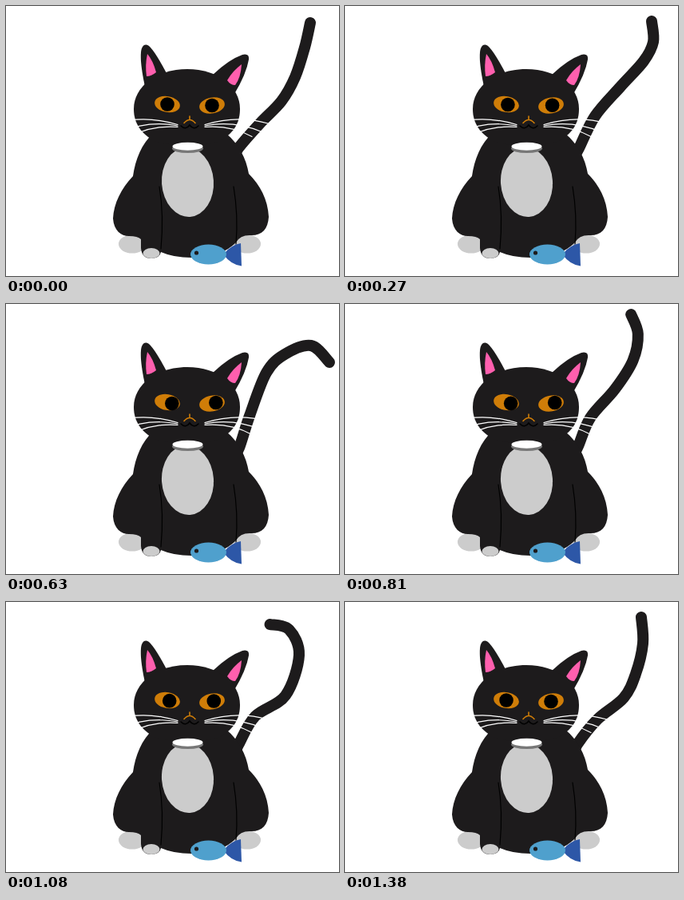
An HTML page that plays this animation: 417 by 338 pixels, repeating every 1410 ms.

```html
<!DOCTYPE html>
<html lang="en">
<head>
<meta charset="utf-8">
<title>Cat with swinging tail</title>
<style>
  html, body { margin: 0; width: 100%; height: 100%; overflow: hidden; background: #fff; }
  svg { display: block; width: 417px; height: 338px; }
  .line { fill: none; stroke-linecap: round; }
</style>
</head>
<body>
<svg viewBox="0 0 417 338" fill="#1d1b1c">
  <path id="tail" class="line" stroke="#1d1b1c" stroke-width="14"/>

  <g fill="#ccc">
    <ellipse cx="158" cy="298" rx="17" ry="11.5"/>
    <ellipse cx="302" cy="298" rx="17" ry="11.5"/>
  </g>
  <path d="M184 160C170 172 162 192 159 213C144 229 135 247 134 266C135 281 144 288 154 288
    Q165 288 169 292V303Q170 316 182 316Q193 315 194 308Q210 315 232 315Q270 315 288 296
    Q293 287 305 287C320 288 328 280 329 264C328 242 318 224 304 210C301 191 291 172 276 160Z"/>
  <g class="line" stroke="#000" stroke-width="1.2">
    <path d="M192 226Q198 262 194 304"/>
    <path d="M285 226Q291 262 288 298"/>
  </g>
  <ellipse cx="182" cy="309.5" rx="10.5" ry="6.5" fill="#ccc"/>

  <ellipse cx="227.5" cy="220.5" rx="32.5" ry="43.5" fill="#ccc" transform="rotate(-4 227.5 220.5)"/>

  <path d="M174 101C170 82 167 62 170 53Q173 46 179 50Q187 57 203 88Z"/>
  <path d="M259 86Q279 67 296 61Q305 59 304 67Q301 85 286 110Z"/>
  <path d="M227 79C266 79 293 101 293 129C293 152 279 163 266 170Q228 180 188 170C174 163 160 151 160 129C160 101 188 79 227 79Z"/>
  <g fill="#ff5fae">
    <path d="M177 60Q184 68 188 83Q182 88 176 88Q174 74 177 60Z"/>
    <path d="M295 73Q284 81 277 93Q281 99 287 99Q294 90 295 73Z"/>
  </g>
  <ellipse cx="227.5" cy="178.5" rx="19.5" ry="5.5" fill="#777"/>
  <ellipse cx="227.5" cy="175.7" rx="19" ry="5" fill="#fff"/>

  <g fill="#cf7d08">
    <ellipse cx="202" cy="123" rx="16" ry="10" transform="rotate(10 202 123)"/>
    <ellipse cx="258" cy="124.5" rx="16" ry="10" transform="rotate(-10 258 124.5)"/>
  </g>
  <g fill="#000">
    <circle id="leftPupil" r="8.8"/>
    <circle id="rightPupil" r="8.8"/>
  </g>
  <g class="line" stroke-width="1.6">
    <path stroke="#cf7d08" d="M230 138V142M223 146.5Q230 138.5 237 146.5"/>
    <path stroke="#000" d="M219 150Q225 156 230 149Q235 156 241 150"/>
  </g>
  <g class="line" stroke="#fff" stroke-width="1.2">
    <path id="whiskers" d="M249 148.500Q290 136 328 147M249 150Q285 143 320 157.500M249 151.500Q282 149 308 163.500"/>
    <use href="#whiskers" transform="matrix(-1 0 0 1 464 0)"/>
  </g>

  <path d="M273 310Q282 299 294 297L295 325.500Q282 324 273 312Z" fill="#2d57a7"/>
  <ellipse cx="253.500" cy="311" rx="22.500" ry="12.500" fill="#4fa0cd"/>
  <circle cx="238.500" cy="309" r="2.600"/>
</svg>
<script>
const LOOP = 1410, STEP = 30;
const $ = id => document.getElementById(id);

// Tail poses: time, then points from base to tip
const poses = [
  [0,    291,178, 318,147, 345,119, 362,89, 374,52, 381,21],
  [270,  293,178, 313,138, 345,101, 374,69, 386,45, 384,19],
  [480,  292,180, 306,138, 331,90, 358,67, 388,47, 424,56],
  [630,  292,180, 305,140, 326,86, 349,63, 382,52, 405,73],
  [780,  292,178, 307,142, 336,105, 360,72, 371,38, 366,8],
  [960,  292,178, 309,143, 348,115, 363,65, 346,35, 319,38],
  [1200, 291,178, 315,143, 352,119, 371,68, 363,34, 342,18],
  [1380, 291,178, 316,147, 349,120, 364,90, 373,52, 371,19]
];
poses.push([LOOP, ...poses[0].slice(1)]);

function tailAt(t) {
  const i = poses.findIndex(p => p[0] > t);
  const a = poses[i - 1], b = poses[i];
  const k = (t - a[0]) / (b[0] - a[0]);
  const v = a.map((n, j) => n + (b[j] - n) * k);
  const points = [[284, 194]];
  for (let j = 1; j < v.length; j += 2) points.push([v[j], v[j + 1]]);
  return points;
}

// Smooth curve through all points
function curve(p) {
  let d = 'M' + p[0];
  for (let i = 0; i < p.length - 1; i++) {
    const a = p[i], b = p[i + 1], before = p[i - 1] || a, after = p[i + 2] || b;
    const c1 = a.map((n, j) => n + (b[j] - before[j]) / 6);
    const c2 = b.map((n, j) => n - (after[j] - a[j]) / 6);
    d += `C${c1} ${c2} ${b}`;
  }
  return d;
}

function place(id, x, y) {
  $(id).setAttribute('transform', `translate(${x} ${y})`);
}

function draw(now) {
  const t = Math.floor(now % LOOP / STEP) * STEP;
  const look = (1 - Math.cos(2 * Math.PI * t / LOOP)) / 2;
  $('tail').setAttribute('d', curve(tailAt(t)));
  place('leftPupil', 202 + 6 * look, 123 + 1.5 * look);
  place('rightPupil', 258 + 5 * look, 124.5 - look);
  requestAnimationFrame(draw);
}
draw(performance.now());
</script>
</body>
</html>
```
